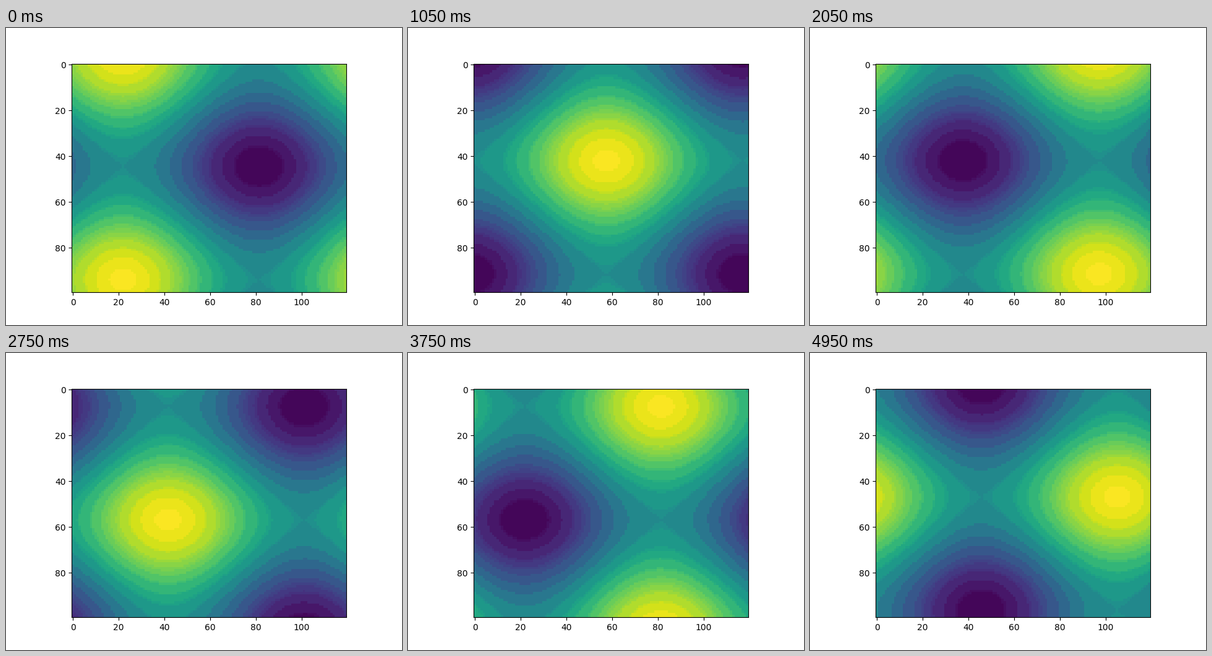
Write a matplotlib script that moves like this. It is 640 px wide and 480 px high and loops after 5 s.

```python
import numpy as np
import matplotlib.pyplot as plt
from matplotlib.animation import FuncAnimation
from matplotlib.colors import ListedColormap

FRAMES = 100
INTERVAL = 50
COLS, ROWS = 120, 100

x = np.linspace(0, 2 * np.pi, COLS)
y = np.linspace(0, 2 * np.pi, ROWS).reshape(-1, 1)


def wave(step):
    return np.sin(x + step * np.pi / 15) + np.cos(y + step * np.pi / 20)


def banded_viridis(field):
    """Viridis merged into flat bands, each the mean colour of its RGB cell."""
    rgb = plt.get_cmap("viridis")(np.arange(256), bytes=True)[:, :3].astype(int)
    red, green, blue = rgb.T
    cell = (red // 32) * 256 + (green // 16) * 8 + blue // 32
    _, band = np.unique(cell, return_inverse=True)

    # Weight each shade by how often the wave shows it.
    weight, _ = np.histogram(field, bins=256)
    total = np.bincount(band, weights=weight)
    means = [np.bincount(band, weights=weight * c) / total for c in rgb.T]
    return ListedColormap(np.floor(np.stack(means, axis=1))[band] / 255)


start = wave(0)
fig, ax = plt.subplots(figsize=(6.4, 4.8), dpi=100)
image = ax.imshow(start, cmap=banded_viridis(start), interpolation="nearest",
                  vmin=start.min(), vmax=start.max())


def update(frame):
    image.set_data(wave(frame + 2))
    return [image]


anim = FuncAnimation(fig, update, frames=FRAMES, interval=INTERVAL,
                     repeat=True, repeat_delay=0)
plt.show()
```
